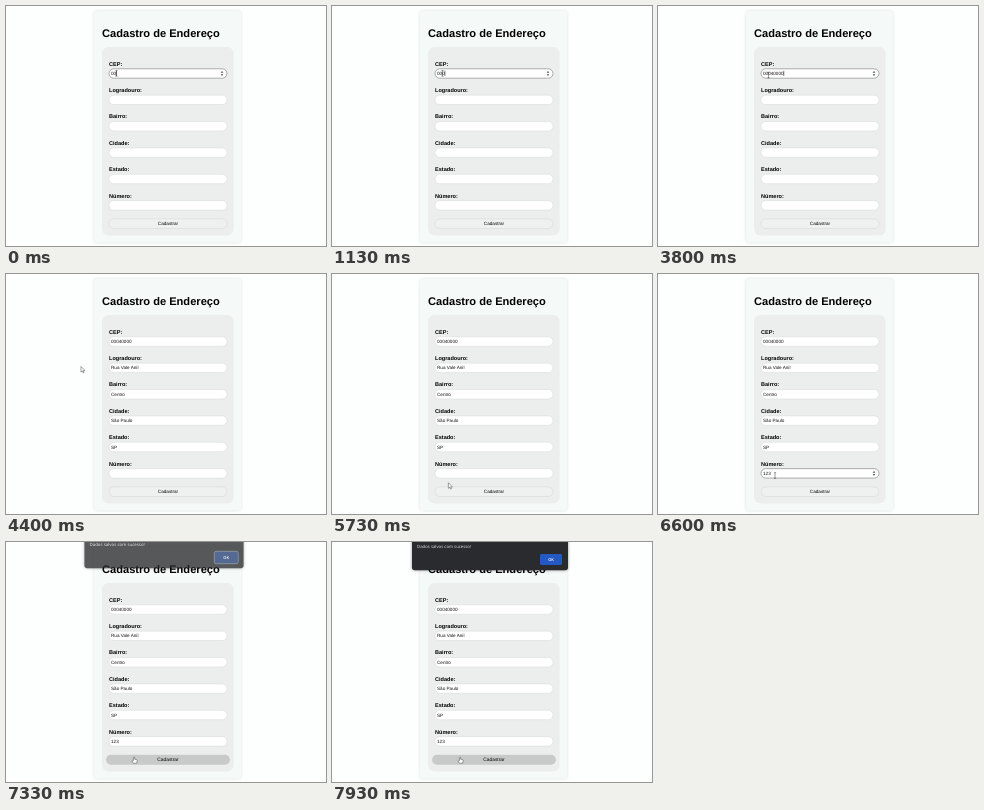
An HTML page that plays this animation: 320 by 240 pixels, repeating every 8000 ms.

```html
<!DOCTYPE html>
<html lang="pt-BR">
<head>
<meta charset="utf-8">
<title>Cadastro de Endereço</title>
<style>
  html, body { margin: 0; width: 100%; height: 100%; overflow: hidden; background: #fdfefe; }
  svg { display: block; width: 100vw; height: 100vh; }
  text { font-family: "Liberation Sans", Arial, sans-serif; text-rendering: geometricPrecision; fill: #000; white-space: pre; }
  .title { font-size: 11.1px; font-weight: bold; }
  .label { font-size: 5.55px; font-weight: bold; }
  .value, .caption { font-size: 4.63px; }
  .value { fill: #111; }
  .caption { text-anchor: middle; }
  .panel { fill: #f5faf8; filter: drop-shadow(0 0 1.6px rgba(40, 80, 70, .16)); }
  .form { fill: #ebeeed; }
  .field { fill: #fff; stroke: #cdd0cf; stroke-width: .4; }
  .focus .field { stroke: #777; stroke-width: .6; }
  .spin { fill: #555; visibility: hidden; }
  .focus .spin { visibility: visible; }
  .caret { stroke: #000; stroke-width: .5; }
  .button rect { fill: #eff0f0; stroke: #cdd0cf; stroke-width: .4; }
  .hover rect { fill: #c8c9c9; stroke: none; }
  .button { transform-origin: 162px 217.7px; }
  .hover { transform: scale(1.05); }
  .sheet { fill: #2a2b2e; filter: drop-shadow(0 .6px 1.6px rgba(0, 0, 0, .4)); }
  .message { font: 4.3px "Open Sans", "Noto Sans", sans-serif; fill: #e4e6e8; }
  .ok { font: 600 4px "Open Sans", "Noto Sans", sans-serif; fill: #fff; text-anchor: middle; }
  .pointer { fill: #fff; stroke: #333; stroke-width: .45; stroke-linejoin: round; }
  .beam { fill: none; stroke: #222; stroke-width: .45; }
</style>
</head>
<body>
<svg viewBox="0 0 320 240" preserveAspectRatio="none">
  <rect class="panel" x="88" y="5" width="147" height="231.5" rx="3.5"/>
  <text class="title" x="96" y="31">Cadastro de Endereço</text>
  <rect class="form" x="96" y="41" width="131.7" height="188.5" rx="6.5"/>
  <g id="fields"></g>
  <g id="button" class="button">
    <rect x="103" y="212.9" width="118" height="9.6" rx="4.8"/>
    <text class="caption" x="162" y="219.3">Cadastrar</text>
  </g>
  <g id="dialog">
    <path class="sheet" d="M80 -12H236V25.5a2.8 2.8 0 0 1-2.8 2.8H82.8a2.8 2.8 0 0 1-2.8-2.8Z"/>
    <text class="message" x="85" y="5.6">Dados salvos com sucesso!</text>
    <rect id="ring" x="207.3" y="11.3" width="23.4" height="12.4" rx="2" fill="none" stroke="#9db8dc" stroke-width=".7"/>
    <rect id="okBox" x="208" y="12" width="22" height="11" rx="1.4" fill="#2459c4"/>
    <text class="ok" x="219" y="19">OK</text>
  </g>
  <g id="cursor">
    <path id="arrow" class="pointer" d="M0 0V5.6L1.3 4.4 2.2 6.4 3.1 6 2.2 4.1H4Z"/>
    <path id="beam" class="beam" d="M-1.1 -2.8H1.1M0 -2.8V2.8M-1.1 2.8H1.1"/>
    <path id="hand" class="pointer" d="M-.6 3.6V.5Q0 -.4 .6 .5V2.4L2.7 2.9Q3.3 3.2 3.2 4L2.6 6.4H-.6L-2.1 4Q-1.8 3.1 -.6 3.9Z"/>
  </g>
</svg>
<script>
const LOOP = 8000, DIGIT = 4.63 * 0.556, LEFT = 105;
const $ = id => document.getElementById(id);
const FILL = 4400, BLUR = 4270, FOCUS = 5930, CLICK = 7200;

const labels = ["CEP", "Logradouro", "Bairro", "Cidade", "Estado", "Número"];
const filled = ["", "Rua Vale Anil", "Centro", "São Paulo", "SP", ""];
const cepKeys = [0, 0, 1000, 1530, 2270, 2600, 2930, 3270];
const numberKeys = [6000, 6070, 6400];

// time, x, y of the pointer's hot spot
const path = [
  [0, 110.5, 67.4], [3770, 110.5, 67.4], [3800, 110.5, 69.1], [3960, 110.5, 69.1],
  [4070, 101, 76], [4200, 83, 89], [4330, 75, 92.5], [4900, 75, 92.5],
  [4930, 74.5, 92.2], [5100, 74.5, 92.2], [5330, 88, 124], [5530, 107, 177],
  [5680, 116, 207], [5750, 116.5, 209.4], [5930, 116, 199.5], [6370, 116, 199.5],
  [6600, 117, 201.5], [7030, 117, 201.5], [7200, 128, 214.8], [LOOP, 128, 214.8]
];

$("fields").innerHTML = labels.map((name, i) => {
  const y = 67.5 + i * 26.37;
  return `<g id="row${i}">
    <text class="label" x="103" y="${y - 7.8}">${name}:</text>
    <rect class="field" x="103" y="${y - 4.7}" width="118" height="9.4" rx="4.7"/>
    <path class="spin" d="M214.6 ${y - .7}l1.4 -1.7 1.4 1.7zM214.6 ${y + .7}l1.4 1.7 1.4 -1.7z"/>
    <text class="value" x="${LEFT}" y="${y + 1.6}"></text>
    <path class="caret" d="M${LEFT} ${y - 2.7}v5.2"/>
  </g>`;
}).join("");

const rows = labels.map((_, i) => {
  const el = $("row" + i);
  return { el, value: el.querySelector(".value"), caret: el.querySelector(".caret") };
});

const show = (el, on) => el.setAttribute("visibility", on ? "visible" : "hidden");
const within = (t, a, b) => t >= a && t < b;
const ramp = (t, a, b) => Math.min(1, Math.max(0, (t - a) / (b - a)));

function setRow(i, text, focused, caretOn) {
  const { el, value, caret } = rows[i];
  if (value.textContent !== text) value.textContent = text;
  el.classList.toggle("focus", focused);
  show(caret, focused && caretOn);
  caret.setAttribute("transform", `translate(${text.length * DIGIT + .2} 0)`);
}

const typed = (text, keys, t) => text.slice(0, keys.filter(k => k <= t).length);

function pointerAt(t) {
  const i = Math.max(1, path.findIndex(p => p[0] > t));
  const [t0, x0, y0] = path[i - 1], [t1, x1, y1] = path[i];
  const k = (t - t0) / (t1 - t0);
  return [x0 + (x1 - x0) * k, y0 + (y1 - y0) * k];
}

function drawPointer(t) {
  const [x, y] = pointerAt(t);
  const inside = x > 103 && x < 221;
  const overField = inside && labels.some((_, i) => Math.abs(y - 67.5 - i * 26.37) < 4.7);
  const overButton = inside && Math.abs(y - 217.7) < 4.8;
  $("cursor").setAttribute("transform", `translate(${x} ${y})`);
  show($("beam"), overField);
  show($("hand"), overButton);
  show($("arrow"), !overField && !overButton);
  $("button").classList.toggle("hover", overButton);
}

function drawDialog(t) {
  const opacity = t < 7270 ? 0 : t < 7330 ? .02 + .76 * ramp(t, 7275, 7330) : .78 + .22 * ramp(t, 7335, 7400);
  const dialog = $("dialog");
  const drop = 2 * (1 - ramp(t, 7335, 7400));
  const grow = 1 + .02 * (1 - ramp(t, 7335, 7400));
  show(dialog, opacity > 0);
  dialog.setAttribute("opacity", opacity);
  dialog.setAttribute("transform", `translate(${158 * (1 - grow)} ${-drop}) scale(${grow} 1)`);
  const settle = ramp(t, 7335, 7600);
  $("ring").setAttribute("opacity", .8 * (1 - settle));
  $("okBox").setAttribute("opacity", .5 + .5 * settle);
}

function draw(now) {
  const t = now % LOOP;
  const caretOff = within(t, 130, 1000) || within(t, 1800, 2270);
  setRow(0, typed("00040000", cepKeys, t), t < BLUR, !caretOff);
  for (let i = 1; i < 5; i++) setRow(i, t >= FILL ? filled[i] : "", false, false);
  setRow(5, typed("123", numberKeys, t), within(t, FOCUS, CLICK), t < 6600);
  drawPointer(t);
  drawDialog(t);
}

const start = performance.now();
function tick() {
  draw(performance.now() - start);
  requestAnimationFrame(tick);
}
tick();
</script>
</body>
</html>
```
